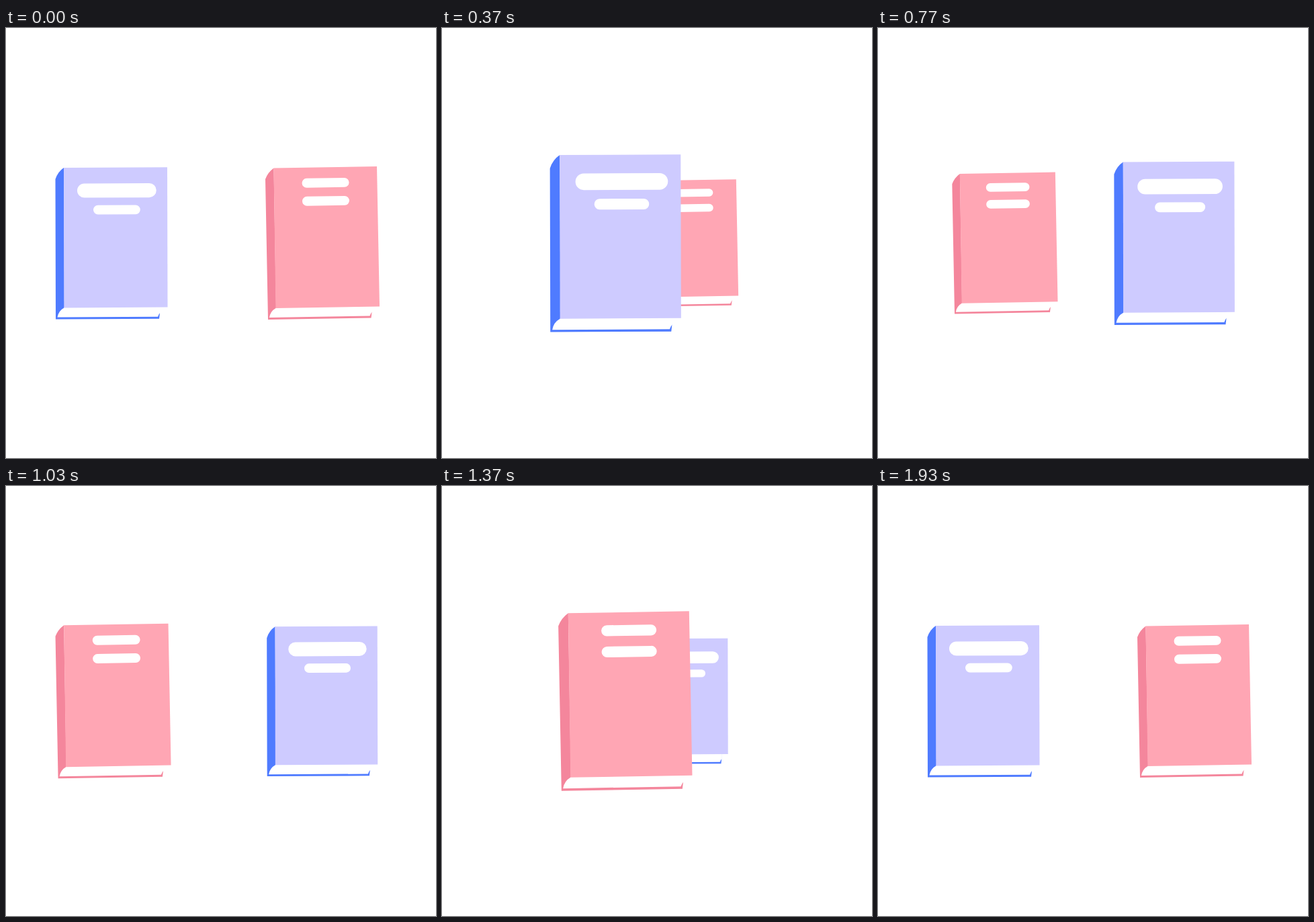
An HTML page without scripts for the animation above (1960 ms loop, 640 px wide and 640 px high).

```html
<!DOCTYPE html>
<html lang="en">
<head>
<meta charset="utf-8">
<title>Two books trading places</title>
<style>
  @property --tick { syntax: "<integer>"; inherits: true; initial-value: 0; }
  @property --n { syntax: "<integer>"; inherits: true; initial-value: 0; }

  html, body { margin: 0; width: 100%; height: 100%; overflow: hidden; background: #fff; }

  .stage {
    position: relative; width: 640px; height: 640px; overflow: hidden; isolation: isolate;
    animation: tick 1960ms steps(59) -4ms infinite;

    /* 25 poses a second, shown at 30 ticks a second */
    --n: calc(var(--tick) * 5 / 6 - .05);

    /* sideways travel: 0 to 1 and back, eased */
    --k: calc(1 - max(var(--n) - 24, 24 - var(--n)) / 24);
    --go: calc(var(--k) * var(--k) * (3 - 2 * var(--k)));

    /* depth: swell on the way out, shrink on the way back */
    --a: max(0, 1 - max(var(--n) - 12, 12 - var(--n)) / 12);
    --b: max(0, 1 - max(var(--n) - 36, 36 - var(--n)) / 12);
    --near: calc(.2 * var(--a) * var(--a) * (3 - 2 * var(--a)));
    --far: calc(.203 * var(--b) * var(--b) * (2.34 - 1.34 * var(--b)));
    --depth: calc(var(--near) - var(--far));
  }
  @keyframes tick { from { --tick: 0; } to { --tick: 59; } }

  .book { position: absolute; left: 0; top: 0; width: 640px; height: 640px; overflow: visible; }
  .blue {
    z-index: calc(24 - var(--n));
    transform: translateX(calc((320 * var(--go) - 163) * 1px)) scale(calc(1 + var(--depth)));
  }
  .pink {
    z-index: 0;
    transform: translateX(calc((151 - 317.7 * var(--go)) * 1px)) scale(calc(1 - var(--depth)));
  }
  .page { fill: #fff; }
  .blue .back { fill: #4f7bff; }
  .blue .cover { fill: #cecbff; }
  .pink .back { fill: #f4869c; }
  .pink .cover { fill: #ffa6b4; }
</style>
</head>
<body>
<div class="stage">
  <svg class="book blue" viewBox="-320 -320 640 640">
    <path class="back" d="M-71-112Q-80-106-83.5-95L-83 113.4L71 112.7L72 104V95H-70Z"/>
    <path class="page" d="M-70.7 96.4Q-79 101-80.5 110.5L69 109.8Q70 106 72.6 103.5V95H-70Z"/>
    <path class="cover" d="M-71-112L83-112.8L83.5 95.6L-70.7 96.4Z"/>
    <g class="page" transform="rotate(-.25)">
      <rect x="-50.7" y="-88.8" width="117.8" height="21.2" rx="10.6"/>
      <rect x="-26.8" y="-56.4" width="69.8" height="13.8" rx="6.9"/>
    </g>
  </svg>
  <svg class="book pink" viewBox="-320 -320 640 640">
    <path class="back" d="M-72.5-111.5Q-81.5-105-85-95L-81 114L72.5 111.5L73.5 103V93L-69 96Z"/>
    <path class="page" d="M-69.5 97Q-77.5 101.5-79 111L70.5 108.5Q71.5 105 74.1 102.3V93L-69 96Z"/>
    <path class="cover" d="M-72.5-111.5L81-114L85 94.4L-69.5 97Z"/>
    <g class="page" transform="rotate(-.93)">
      <rect x="-29" y="-96.5" width="70" height="13.8" rx="6.9"/>
      <rect x="-29" y="-69.5" width="70" height="13.8" rx="6.9"/>
    </g>
  </svg>
</div>
</body>
</html>
```
